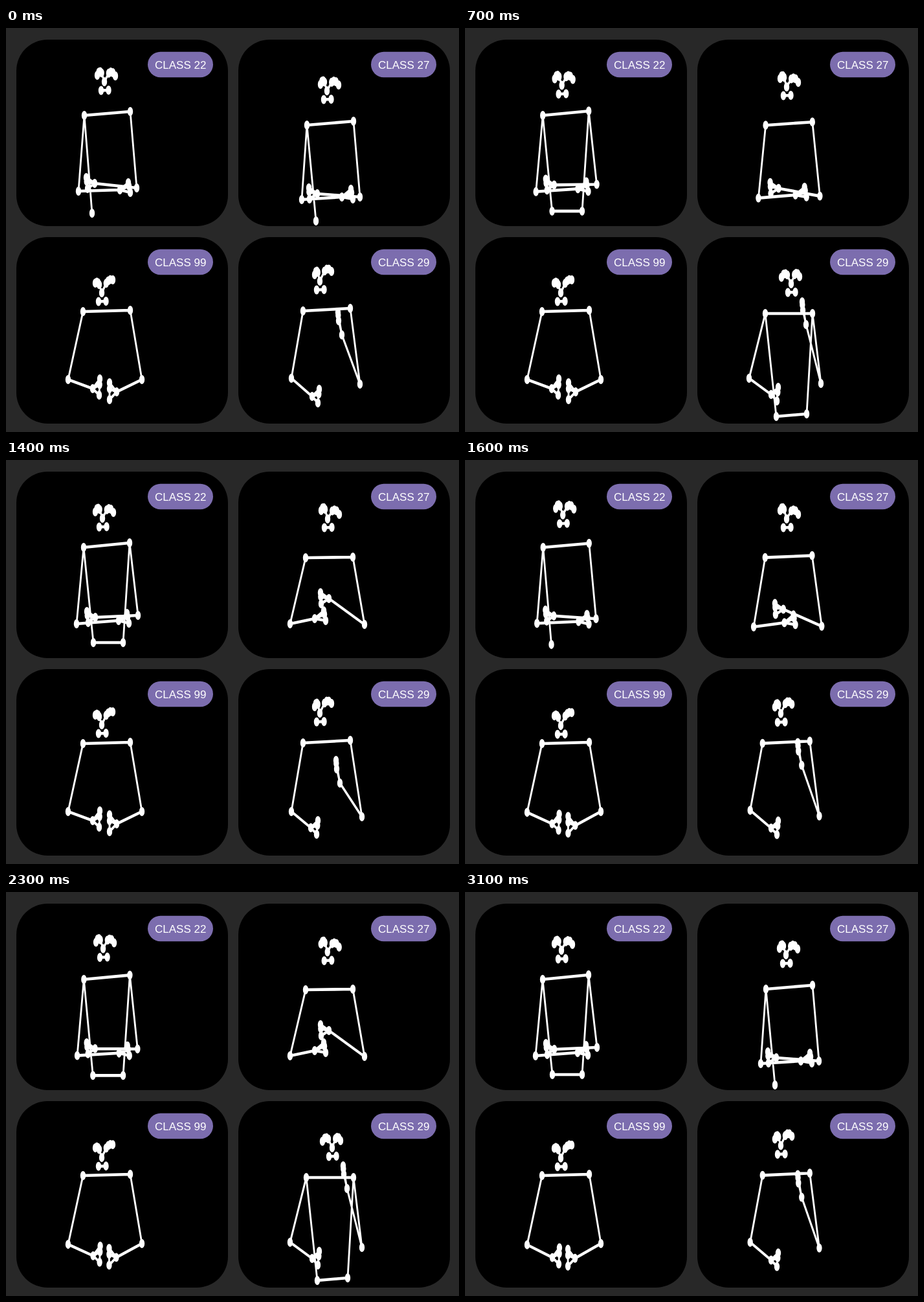
An HTML page for the animation above (3.2 s loop, 700x624 px).

```html
<!DOCTYPE html>
<html lang="en">
<head>
<meta charset="utf-8">
<title>Pose classes</title>
<style>
  html, body { margin: 0; width: 100%; height: 100%; overflow: hidden; background: #282828; }
  svg { display: block; width: 700px; height: 624px; }
  text { font: 17px "Liberation Sans", Arial, sans-serif; fill: #fff; text-anchor: middle; }
  path { fill: none; stroke: #fff; stroke-linecap: round; stroke-linejoin: round; }
  .bones { stroke-width: 2.8; }
  .joints { stroke-width: 8.4; }
</style>
</head>
<body>
<svg id="stage" viewBox="0 0 700 624"></svg>
<script>
const STEP = 100, LOOP_STEPS = 32;
const STRETCH = 1.65; // the figures are drawn taller than wide

// A figure is a rest pose plus moves. Coordinates are x,y pairs, image-left first.
// "face" holds the ears relative to the nose, a hand its two ends relative to the wrist.
// A move shifts parts while it rises, holds and falls over four times of the cycle.
const figures = [
  {
    label: "CLASS 22", x: 16, y: 18, pillX: 219, period: 17, browLift: 10,
    hipsVisible: s => [true, s > 5 && s < 16],
    rest: {
      nose: [152, 83], face: [-11, -10, 17, -9], shoulders: [121, 135, 192, 129],
      elbows: [112, 252, 202, 247], wrists: [176, 250, 137, 240],
      leftHand: [13, -11, 16, 4], rightHand: [-13, -9, -11, 8], hips: [133, 286, 181, 286]
    },
    moves: [{over: [0, 10, 14, 17], nose: [-3, 7], shoulders: [-1, 0, -1, -1],
      elbows: [-3, 1, 2, -7], wrists: [-2, -2, 1, 3], hips: [2, -4, 0, -4]}]
  },
  {
    label: "CLASS 27", x: 359, y: 18, pillX: 564, period: 10, browLift: 10,
    hipsVisible: s => [s > 7 || s < 2, false],
    rest: {
      nose: [496, 97], face: [-10, -10, 18, -9], shoulders: [465, 150, 537, 144],
      elbows: [457, 265, 547, 261], wrists: [519, 261, 481, 256],
      leftHand: [14, -12, 17, 3], rightHand: [-13, -9, -12, 8], hips: [479, 298, 530, 298]
    },
    moves: [
      {over: [1, 3, 4.5, 8], shoulders: [-2, 1, -1, 6],
        elbows: [-18, -12, 7, -7], wrists: [-42, -16, 18, -42]},
      {over: [1, 4, 7, 10], nose: [1, -6], face: [0, -3, 0, 2]}
    ]
  },
  {
    label: "CLASS 99", x: 16, y: 323, pillX: 219, period: 7, browLift: 7,
    hipsVisible: () => [false, false],
    rest: {
      nose: [148, 409], face: [-10, -15, 17, -20], shoulders: [119, 438, 192, 436],
      elbows: [96, 543, 210, 543], wrists: [134, 557, 171, 562],
      leftHand: [11, -15, 10, 10], rightHand: [-11, -14, -11, 12]
    },
    moves: [
      {over: [0, 3.5, 3.5, 7], nose: [0, 2], elbows: [0, 2, 0, 0], wrists: [1, 8, -1, 4]},
      {over: [3, 4, 4, 6], nose: [-1, -4], elbows: [1, -4, 1, -1], wrists: [-8, -3, 4, 0]}
    ]
  },
  {
    label: "CLASS 29", x: 359, y: 323, pillX: 564, period: 15, browLift: 10,
    hipsVisible: s => [s > 5 && s < 13, s > 5 && s < 13],
    rest: {
      nose: [485, 391], face: [-8, -10, 18, -15], shoulders: [459, 437, 532, 433],
      elbows: [441, 541, 547, 550], wrists: [473, 569, 519, 474],
      leftHand: [11, -11, 9, 10], rightHand: [-6, -35, -5, -22], hips: [481, 600, 528, 596]
    },
    moves: [
      {over: [0, 4, 10, 14], nose: [19, 4], face: [-7, 0, -5, 4], shoulders: [5, 4, 5, 8],
        elbows: [-2, 0, 3, -1], wrists: [0, -3, 8, -16]},
      {over: [11, 14, 14, 15], elbows: [0, 2, 3, 1], wrists: [-2, -1, -3, 25]}
    ]
  }
];

const mix = (a, b, k) => a.map((v, i) => v + (b[i] - v) * k);
const add = (a, b) => a.map((v, i) => v + b[i]);
const pairs = list => [list.slice(0, 2), list.slice(2)];

function smooth(t) {
  const k = Math.min(1, Math.max(0, t));
  return k * k * (3 - 2 * k);
}

const pulse = (t, [start, top, end, bottom]) =>
  smooth((t - start) / (top - start)) * (1 - smooth((t - end) / (bottom - end)));

function poseAt({rest, moves}, step) {
  const pose = {...rest};
  for (const {over, ...shifts} of moves) {
    const weight = pulse(step, over);
    for (const [part, shift] of Object.entries(shifts)) {
      pose[part] = pose[part].map((v, i) => v + shift[i] * weight);
    }
  }
  return pose;
}

const toPath = points =>
  "M" + points.map(([x, y]) => `${x.toFixed(2)} ${(y / STRETCH).toFixed(2)}`).join("L");

function drawFigure(figure, step) {
  const pose = poseAt(figure, step);
  const bones = [], joints = [];
  const chain = (...points) => { bones.push(points); };
  const dots = (...points) => { joints.push(...points); };

  const {nose} = pose;
  dots(nose);
  for (const offset of pairs(pose.face)) {
    const ear = add(nose, offset);
    const eyes = [0.4, 0.58, 0.77].map(k =>
      add(mix(nose, ear, k), [0, -figure.browLift * 4 * k * (1 - k)]));
    chain(nose, ...eyes, ear);
    dots(...eyes, ear);
  }
  const mouth = [add(nose, [-5, 13.5]), add(nose, [6.5, 13])];
  chain(...mouth);
  dots(...mouth);

  const shoulders = pairs(pose.shoulders);
  const elbows = pairs(pose.elbows);
  const wrists = pairs(pose.wrists);
  chain(...shoulders);
  [pose.leftHand, pose.rightHand].forEach((hand, side) => {
    const wrist = wrists[side];
    const [upper, lower] = pairs(hand).map(offset => add(wrist, offset));
    const middle = mix(upper, lower, 0.35);
    chain(shoulders[side], elbows[side], wrist, upper, lower, wrist, middle);
    dots(shoulders[side], elbows[side], wrist, upper, middle, lower);
  });

  const visible = figure.hipsVisible(step);
  if (visible.some(Boolean)) {
    const hips = pairs(pose.hips);
    hips.forEach((hip, side) => {
      if (!visible[side]) return;
      chain(shoulders[side], hip);
      dots(hip);
    });
    if (visible.every(Boolean)) chain(...hips);
  }

  figure.bones.setAttribute("d", bones.map(toPath).join(""));
  figure.joints.setAttribute("d", joints.map(p => toPath([p]) + "h0").join(""));
}

const stage = document.getElementById("stage");
stage.innerHTML = figures.map(({label, x, y, pillX}) => `
  <rect x="${x}" y="${y}" width="327" height="288" rx="48"/>
  <g transform="scale(1 ${STRETCH})"><path class="bones"/><path class="joints"/></g>
  <rect x="${pillX}" y="${y + 18.7}" width="101" height="39.5" rx="19.7" fill="#7c6dae"/>
  <text x="${pillX + 50.7}" y="${y + 45}">${label}</text>`).join("");
const boneSlots = stage.querySelectorAll(".bones");
const jointSlots = stage.querySelectorAll(".joints");
figures.forEach((figure, i) => {
  figure.bones = boneSlots[i];
  figure.joints = jointSlots[i];
});

function render() {
  const step = Math.floor(performance.now() / STEP) % LOOP_STEPS;
  for (const figure of figures) drawFigure(figure, step % figure.period);
  requestAnimationFrame(render);
}
render();
</script>
</body>
</html>
```
